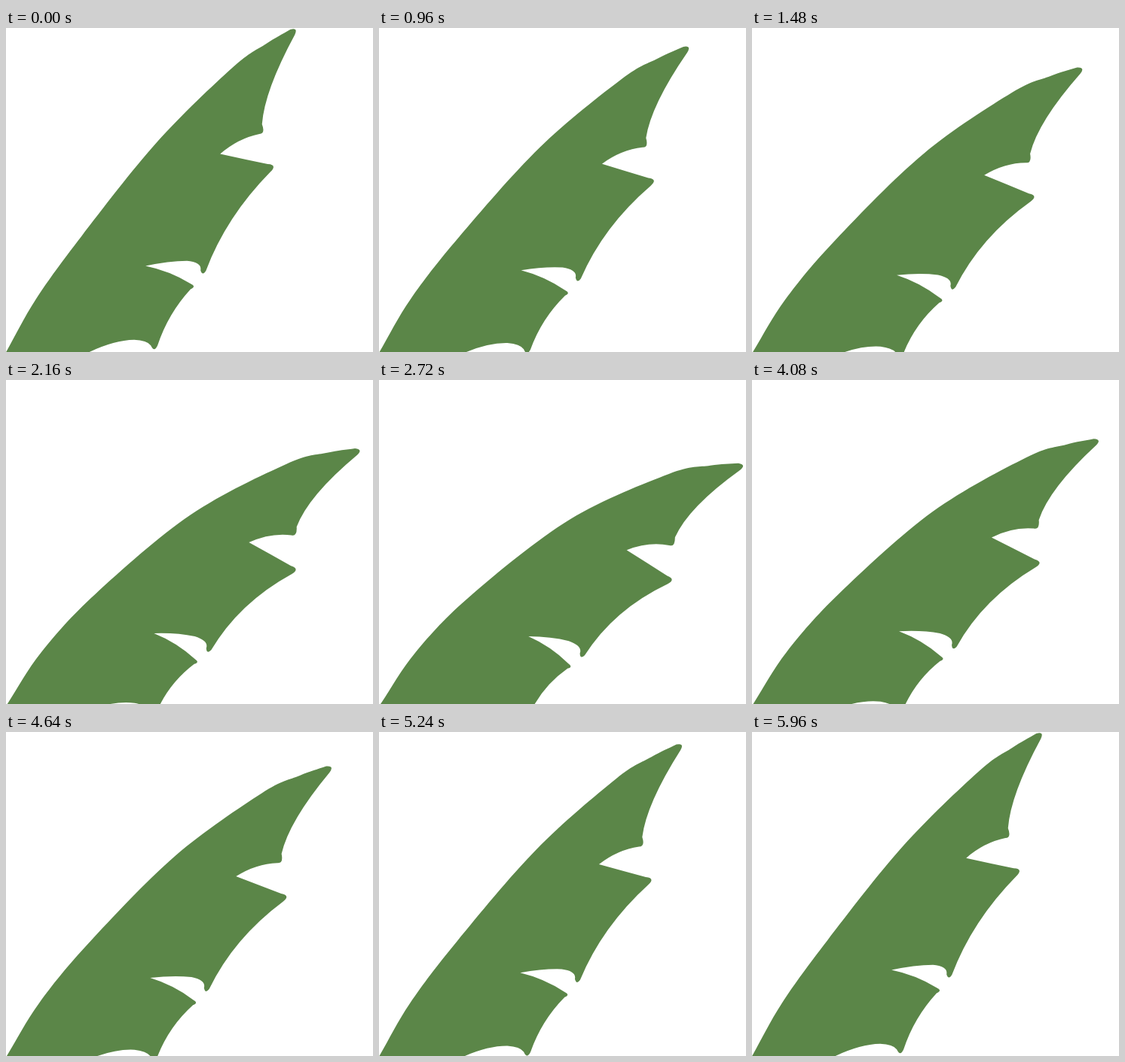
Animation, 487 px wide and 431 px high, one loop 6 s. Source, as an HTML page:

```html
<!DOCTYPE html>
<html lang="en">
<head>
<meta charset="utf-8">
<title>Swaying leaf</title>
<style>
  html, body { margin: 0; width: 100%; height: 100%; overflow: hidden; background: #fff; }
  svg { display: block; }
</style>
</head>
<body>
<svg width="487" height="431" viewBox="0 0 487 431"><path id="leaf" fill="#5b8648"/></svg>
<script>
const LOOP = 6000, STEP = 40;
const CURVE = 0.000754;           // curvature of the leaf when fully bent
const UX = 0.63, UY = -0.777;     // direction of the leaf's axis
const ROOT = -398, AXIS = 297;    // where the bend starts, and where the axis lies

// Smooth back of the upright leaf, from the base to the tip.
const back = [[0, 431], [40, 360], [100, 277], [200, 152], [300, 53], [345, 21], [377, 2]];

// Torn side, from the tip down: one point rounds a corner, two curve through the first.
const side = [
  [[383, 9]],
  [[352, 76], [339.5, 128]],
  [[341, 137.5], [336, 141]],
  [[309, 150.5], [284, 167.5]],
  [[316, 174.5], [347, 181]],
  [[351, 191]],
  [[300, 254], [265, 323]],
  [[258, 322]],
  [[254.5, 313.5], [240, 309.5]],
  [[214, 311.3], [185, 316.3]],
  [[216, 325.5], [245, 340]],
  [[245, 347]],
  [[219, 382], [201, 422]],
  [[192, 422]],
  [[184, 416.8], [170, 414.6]],
  [[141, 419.2], [108, 432]]
];

const mix = (a, b, k) => a.map((v, i) => v + (b[i] - v) * k);
const fmt = (...pts) => pts.map(p => p.map(v => v.toFixed(2)).join(" ")).join(" ");

// Rolls the straight axis into a circular arc of curvature k.
function bend([x, y], k) {
  const along = x * UX + y * UY - ROOT;
  const across = y * UX - x * UY - AXIS;
  const r = 1 / k, a = along * k;
  const s = (r - across) * Math.sin(a) + ROOT;
  const n = r - (r - across) * Math.cos(a) + AXIS;
  return [s * UX - n * UY, s * UY + n * UX];
}

function backPath(p) {
  const last = p.length - 1;
  const pts = [mix(p[0], p[1], -1), ...p, mix(p[last], p[last - 1], -1)];
  let d = "M" + fmt(p[0]);
  for (let i = 0; i < last; i++) {
    const [a, b, c, e] = pts.slice(i, i + 4);
    const c1 = b.map((v, j) => v + (c[j] - a[j]) / 6);
    const c2 = c.map((v, j) => v - (e[j] - b[j]) / 6);
    d += "C" + fmt(c1, c2, c);
  }
  return d;
}

function outline(k) {
  const spine = back.map(p => bend(p, k));
  let d = backPath(spine);
  let from = spine[spine.length - 1];
  for (const edge of side) {
    const pts = edge.map(p => bend(p, k));
    const to = pts[pts.length - 1];
    const half = mix(from, to, 0.5);
    const mid = pts.length > 1
      ? pts[0]
      : [half[0] + 0.55 * (to[1] - from[1]), half[1] - 0.55 * (to[0] - from[0])];
    d += "Q" + fmt(mix(half, mid, 2), to);
    from = to;
  }
  return d + "L60 480L-20 480Z";
}

const leaf = document.getElementById("leaf");
const start = performance.now();

function draw() {
  const t = Math.floor((performance.now() - start) % LOOP / STEP) * STEP;
  const sway = (1 - Math.cos(2 * Math.PI * t / LOOP)) / 2;
  leaf.setAttribute("d", outline(Math.max(CURVE * sway, 1e-8)));
  requestAnimationFrame(draw);
}
draw();
</script>
</body>
</html>
```
